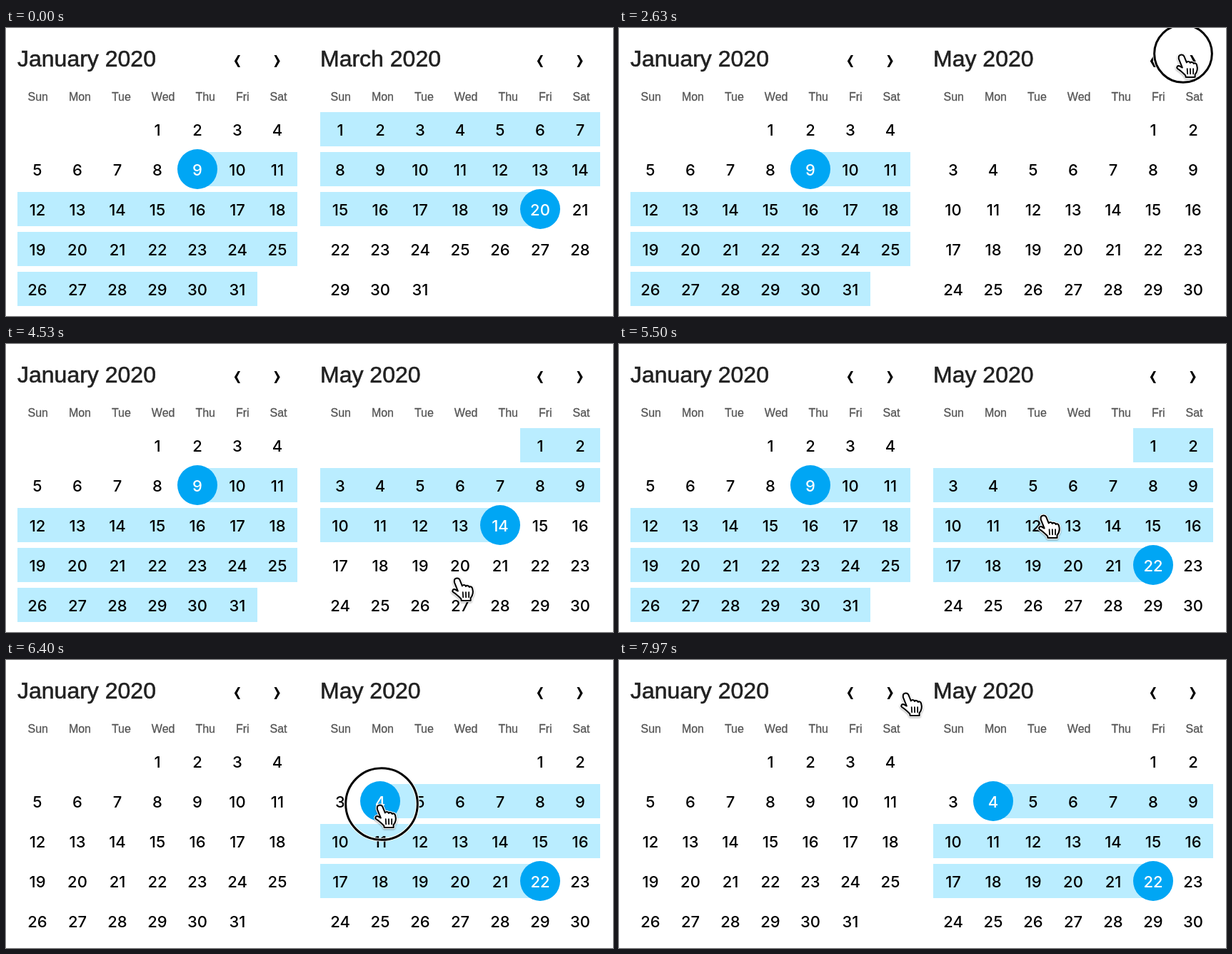
These frames come from a looping animation (850x404 px, 8 s). An HTML page:

```html
<!DOCTYPE html>
<html lang="en">
<head>
<meta charset="utf-8">
<title>Date range picker</title>
<style>
  html, body { margin: 0; width: 100%; height: 100%; overflow: hidden; background: #fff; }
  #stage { position: relative; width: 850px; height: 404px; overflow: hidden; background: #fff; }
  svg { position: absolute; left: 0; top: 0; }
  .week {
    position: absolute; top: 87px; width: 392px; display: flex; justify-content: space-around;
    font: 16px/20px "Liberation Sans", Arial, sans-serif; color: #555; -webkit-text-stroke: .3px #555;
  }
  .title { font: 32px "Liberation Sans", Arial, sans-serif; fill: #212121; stroke: #212121; stroke-width: .6; }
  .day { font: 500 22px Inter, sans-serif; text-anchor: middle; fill: #000; }
  .picked { fill: #fff; }
  .bar { fill: #baedff; }
  .dot { fill: #00a6f4; }
  #hand { filter: drop-shadow(0 1.5px 1px rgba(0, 0, 0, .35)); }
</style>
</head>
<body>
<div id="stage">
  <div class="week" style="left:16px"></div>
  <div class="week" style="left:440px"></div>
  <svg width="850" height="404" viewBox="0 0 850 404">
    <defs>
      <path id="arrow" d="M.8-8H4L-.4.5 4 9H.8L-4.2.5Z"/>
      <path id="palm" d="M-4.5 2.8C-3-.2 1.5-.2 2.8 2.8L6.2 11C7 9.3 10.3 9.3 11 11.6 12.2 10 15 10.2 15.8 12.6 17 11.3 19.6 11.9 20 14.6 21.3 19 20.6 24 17.6 27.4V31H5L4.6 28.6C1.5 25.5-2 22-6.2 19.5-8 17.5-6.5 15-3.5 15.8L.3 18-4.6 6Z"/>
    </defs>
    <g id="left"></g>
    <g id="right"></g>
    <use href="#arrow" x="324" y="46"/>
    <use href="#arrow" transform="translate(379.5 46) scale(-1 1)"/>
    <use href="#arrow" x="748" y="46"/>
    <use href="#arrow" transform="translate(803.5 46) scale(-1 1)"/>
    <g id="ring" fill="none">
      <circle stroke="#fff" stroke-width="5"/>
      <circle stroke="#000" stroke-width="3"/>
    </g>
    <g id="pointer">
      <g id="hand" transform="translate(-1.5 1) scale(1.03)" stroke-linejoin="round" stroke-linecap="round">
        <use href="#palm" fill="#fff" stroke="#fff" stroke-width="4"/>
        <use href="#palm" fill="#fff" stroke="#000" stroke-width="2"/>
        <path d="M7 19.5L7.4 26.5M11.1 19.5L11.3 26.5M15.2 19.5V26.5" stroke="#000" stroke-width="1.7"/>
      </g>
    </g>
  </svg>
</div>
<script>
const LOOP = 8000, YEAR = 2020, CELL = 56;
const RING_MS = 320, RING_R = 62, REACT_MS = 80;

// Dates are month * 100 + day
const START = { month: 3, from: 109, to: 320 };

// Pointer glides from go to reach
const MOVES = [
  { go: 1000, reach: 1390, x: 790, y: 36 },
  { go: 2820, reach: 3400, x: 714, y: 259 },
  { go: 3900, reach: 4530, x: 634, y: 327 },
  { go: 4530, reach: 4730, x: 748, y: 315 },
  { go: 5070, reach: 5610, x: 579, y: 230 },
  { go: 5960, reach: 6200, x: 526, y: 202 },
  { go: 6500, reach: 7100, x: 729, y: 31 },
  { go: 7110, reach: 7830, x: 404, y: 45 }
];

// Each click changes part of the state
const CLICKS = [
  { at: 1900, set: { month: 4 } },
  { at: 2500, set: { month: 5 } },
  { at: 3350, set: { to: 514 } },
  { at: 4730, set: { to: 522 } },
  { at: 5620, set: { from: 512 } },
  { at: 6220, set: { from: 504 } }
];

const $ = id => document.getElementById(id);
const weekdays = 'Sun Mon Tue Wed Thu Fri Sat'.split(' ').map(d => `<span>${d}</span>`).join('');
document.querySelectorAll('.week').forEach(w => { w.innerHTML = weekdays; });

function calendar(x0, month, { from, to }) {
  const firstDay = new Date(YEAR, month - 1, 1);
  const offset = firstDay.getDay(), days = new Date(YEAR, month, 0).getDate();
  const name = firstDay.toLocaleString('en-US', { month: 'long' });
  let bars = '', dots = '', text = `<text class="title" x="${x0}" y="54">${name} ${YEAR}</text>`;
  for (let d = 1; d <= days; d++) {
    const slot = offset + d - 1, date = month * 100 + d;
    const x = x0 + slot % 7 * CELL, y = 118 + Math.floor(slot / 7) * CELL;
    const mid = x + CELL / 2, isEnd = date === from || date === to;
    if (date >= from && date <= to) {
      const left = date === from ? mid : x, width = isEnd ? CELL / 2 : CELL;
      bars += `<rect class="bar" x="${left}" y="${y}" width="${width}" height="48"/>`;
    }
    if (isEnd) dots += `<circle class="dot" cx="${mid}" cy="${y + 24}" r="28"/>`;
    text += `<text class="day${isEnd ? ' picked' : ''}" x="${mid}" y="${y + 33}">${d}</text>`;
  }
  return bars + dots + text;
}

function pointerAt(t) {
  let x = 868, y = 62;
  for (const m of MOVES) {
    const u = Math.min(1, Math.max(0, (t - m.go) / (m.reach - m.go)));
    const ease = u * u * (3 - 2 * u);
    x += (m.x - x) * ease;
    y += (m.y - y) * ease;
  }
  return `translate(${x} ${y})`;
}

const ring = $('ring'), pointer = $('pointer');
let shown = -1;

function draw(t) {
  const done = CLICKS.filter(c => t >= c.at + REACT_MS);
  if (done.length !== shown) {
    shown = done.length;
    const state = Object.assign({}, START, ...done.map(c => c.set));
    $('left').innerHTML = calendar(16, 1, state);
    $('right').innerHTML = calendar(440, state.month, state);
  }

  const place = pointerAt(t);
  pointer.setAttribute('transform', place);
  pointer.setAttribute('visibility', t < MOVES[0].go ? 'hidden' : 'visible');

  const click = CLICKS.find(c => t >= c.at && t < c.at + RING_MS);
  ring.setAttribute('visibility', click ? 'visible' : 'hidden');
  if (click) {
    const rest = 1 - (t - click.at) / RING_MS;
    ring.setAttribute('transform', place);
    for (const c of ring.children) c.setAttribute('r', RING_R * (1 - rest * rest));
  }
}

const begin = performance.now();
function tick() {
  draw((performance.now() - begin) % LOOP);
  requestAnimationFrame(tick);
}
tick();
</script>
</body>
</html>
```
